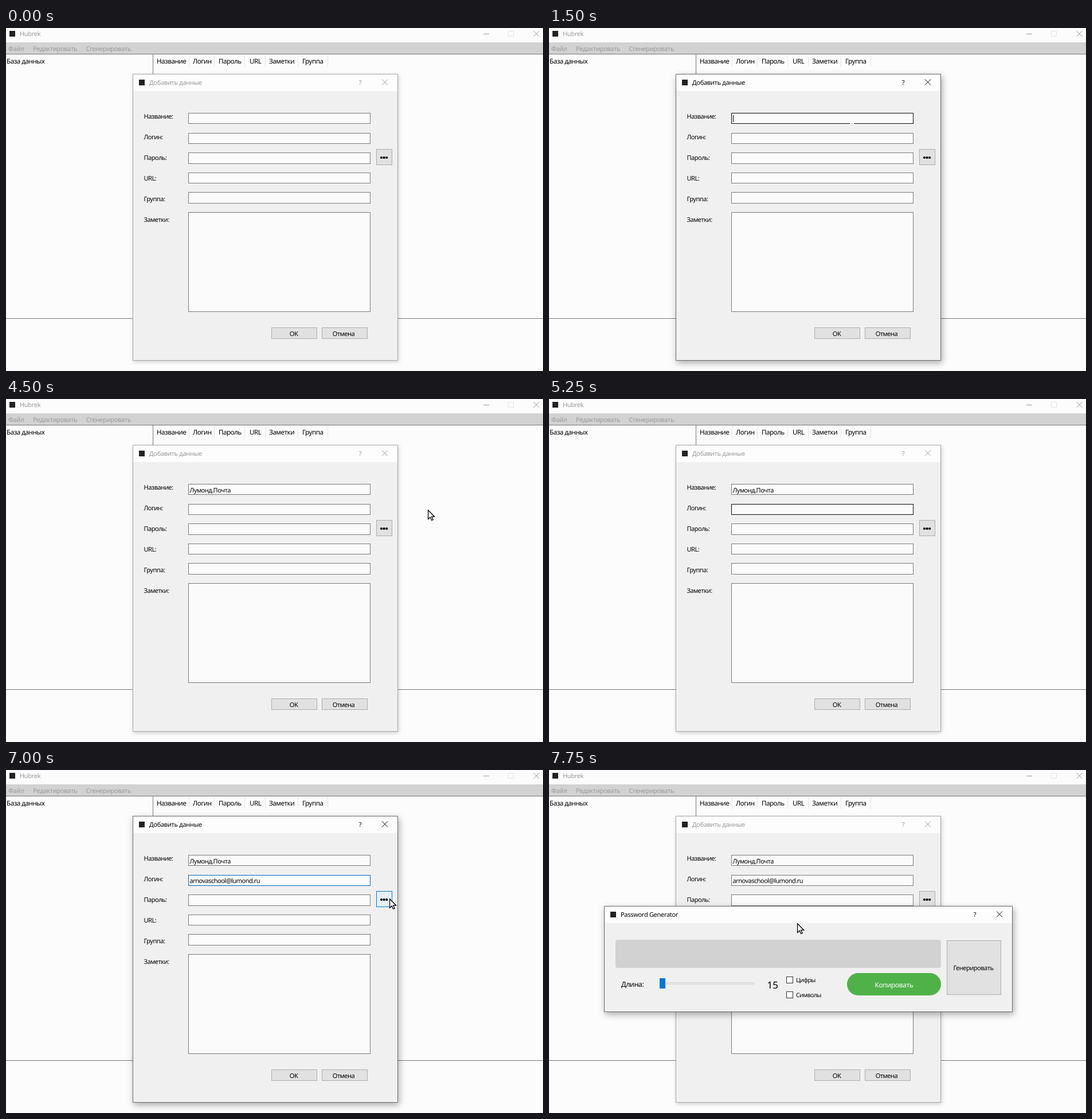
Recreate the animation shown at these times as an HTML page. Size 937 by 598 pixels, loop 8 s.

```html
<!DOCTYPE html>
<html lang="ru">
<meta charset="utf-8">
<title>Добавить данные</title>
<style>
  html, body { margin: 0; width: 100%; height: 100%; overflow: hidden; background: #fcfcfc; }
  svg { display: block; }
  text { font: 11px "Noto Sans", "Open Sans", sans-serif; letter-spacing: -.5px; text-rendering: geometricPrecision; }
  text.ui { letter-spacing: -.3px; }
  text.head { font-size: 11.6px; }
  text.check { font-size: 10.4px; }
  text.big { font-size: 17px; font-weight: 500; letter-spacing: 0; }
  text.length { font-size: 12.5px; }
  text.copy { font-size: 12px; letter-spacing: -.4px; fill: #fff; }
  text.mid { text-anchor: middle; }
  .gray { fill: #999; }
  .line { fill: none; stroke: #777; }
  .field { fill: #fbfbfb; stroke: #7a7a7a; }
  .field.focus { stroke: #0067b3; }
  .field.hover { stroke: #0a0a0a; }
  .button { fill: #e1e1e1; stroke: #adadad; }
  .button.hover { fill: #e5f1fb; stroke: #0078d7; }
  .window { color: #999; --edge: #aaa; filter: drop-shadow(1px 2px 3px #0003); }
  .window.active { color: #000; --edge: #6c6c6c; filter: drop-shadow(2px 4px 6px #0005); }
  .frame { fill: #f0f0f0; stroke: var(--edge); }
  .bar { fill: currentColor; }
  .cross { fill: none; stroke: currentColor; }
</style>
<body>
<svg id="stage" width="937" height="598" viewBox="0 0 937 598"></svg>
<script>
const text = (x, y, str, cls = '', id = '') => `<text id="${id}" class="${cls}" x="${x}" y="${y}">${str}</text>`;
const rect = (x, y, w, h, attrs) => `<rect x="${x}" y="${y}" width="${w}" height="${h}" ${attrs}/>`;
// Outlined box given by its outer pixel edges
const box = (x, y, w, h, cls, id = '') => rect(x + .5, y + .5, w - 1, h - 1, `class="${cls}" id="${id}"`);
const cross = (x, y) => `<path class="cross" d="M${x - 5} ${y - 5}l10 10m0-10l-10 10"/>`;
const icon = (x, y) => rect(x - 5, y - 5, 10, 10, 'fill="#222"');

const windowFrame = (x, y, w, h, title) =>
  box(x, y, w, h, 'frame') + rect(x + 1, y + 1, w - 2, 29, 'fill="#fdfdfd"') +
  icon(x + 16, y + 15) + text(x + 29, y + 19, title, 'ui bar') +
  text(x + w - 66, y + 19, '?', 'ui bar mid') + cross(x + w - 23, y + 14.5);

const labels = ['Название', 'Логин', 'Пароль', 'URL', 'Группа', 'Заметки'];
const fieldTops = [148, 183, 217, 252, 286, 321];
const fieldHeights = [19, 19, 20, 19, 20, 174];
const columns = [[263, 'Название'], [326, 'Логин'], [371, 'Пароль'], [425, 'URL'], [459, 'Заметки'], [517, 'Группа']];
const dividers = [319, 363, 416, 452, 509, 561];

const mainWindow =
  rect(0, 0, 937, 598, 'fill="#fcfcfc"') +
  icon(11, 10) + text(24, 14, 'Hubrek', 'ui gray') +
  '<path fill="none" stroke="#999" d="M833 10.5h10M920.5 5l10 10m0-10l-10 10"/>' +
  '<path fill="none" stroke="#e2e2e2" d="M876.5 5.5h9v9h-9z"/>' +
  rect(0, 25, 937, 21, 'fill="#d2d2d2"') +
  text(4, 39.5, 'Файл', 'ui gray') + text(47, 39.5, 'Редактировать', 'ui gray') + text(139.5, 39.5, 'Сгенерировать', 'ui gray') +
  '<path class="line" d="M0 45.5h937M256.5 46v460M0 506.5h937"/>' +
  text(1, 61.5, 'База данных', 'head') +
  columns.map(([x, name]) => text(x, 61.5, name, 'head')).join('') +
  `<path fill="none" stroke="#e3e3e3" d="${dividers.map(x => `M${x + .5} 47v21`).join('')}"/>`;

const dialog = windowFrame(221, 80, 463, 500, 'Добавить данные') +
  labels.map((name, i) => text(240.5, 158 + 36 * i, name + ':') +
    box(318, fieldTops[i], 318, fieldHeights[i], 'field', 'field' + i)).join('') +
  text(320.5, 162.5, 'Лумонд.Почта', '', 'value0') + text(320.5, 197, 'arnovaschool@lumond.ru', '', 'value1') +
  '<path id="caret" stroke="#000" d="M.5 0v12"/>' +
  box(646, 211, 28, 28, 'button', 'more') +
  [655, 659.6, 664.2].map(x => `<circle cx="${x}" cy="226" r="2.1"/>`).join('') +
  box(463, 522, 80, 20, 'button') + text(502, 536.5, 'OK', 'mid') +
  box(551, 522, 80, 20, 'button') + text(589, 536.5, 'Отмена', 'mid');

const generator = windowFrame(96, 237, 713, 185, 'Password Generator') +
  rect(116, 296, 568, 49, 'rx="4" fill="#d2d2d2"') +
  box(694, 297, 95, 95, 'button') + text(740.5, 349, 'Генерировать', 'mid') +
  text(126, 378, 'Длина:', 'length') +
  rect(193.5, 370.5, 164, 3, 'fill="#e7e7e7" stroke="#d6d6d6"') + rect(193, 363, 10, 18, 'fill="#0078d7"') +
  text(380.5, 381, '15', 'big') +
  [[360, 'Цифры'], [386, 'Символы']].map(([y, name]) =>
    rect(414.5, y + .5, 11, 11, 'fill="#fff" stroke="#333"') + text(431, y + 10, name, 'check')).join('') +
  rect(520, 354, 164, 39, 'rx="19.5" fill="#4fb248"') + text(602, 378.5, 'Копировать', 'copy mid');

const stage = document.getElementById('stage');
stage.innerHTML = mainWindow +
  `<g id="dialog" class="window">${dialog}</g>
  <path id="beam" fill="none" stroke="#fff" d="M0 .5h3m1 0h3"/>
  <g id="generator" class="window active">${generator}</g>
  <path id="arrow" fill="#fff" stroke="#000" stroke-width="1.3" d="M.6 .9v15.6l3.6-3.5 2.6 5.5 2.4-1-2.5-5.3h5z"/>`;

const initial = { active: false, focus: -1, hover: -1, filled: 0, caret: false, arrow: null, beam: null, more: false, generator: 0 };
// Each step changes the state from its time (ms) on
const steps = [
  [500, { arrow: [675, 434] }],
  [750, { arrow: null, beam: [575, 305] }],
  [1000, { beam: null, hover: 1 }],
  [1250, { hover: 0 }],
  [1500, { active: true, focus: 0, caret: true, beam: [525, 166] }],
  [2000, { filled: 1 }],
  [2250, { hover: -1, beam: null, arrow: [797, 194] }],
  [2500, { arrow: null }],
  [2750, { caret: false }],
  [3250, { active: false, focus: -1 }],
  [4500, { arrow: [736, 193] }],
  [4750, { arrow: [568, 176] }],
  [5000, { arrow: [512, 177] }],
  [5250, { arrow: null, hover: 1 }],
  [5500, { active: true, focus: 1, caret: true }],
  [6000, { filled: 2, beam: [533, 217] }],
  [6250, { hover: -1, beam: null, arrow: [676, 225] }],
  [6500, { arrow: [680, 223] }],
  [6750, { arrow: [669, 224], more: true }],
  [7000, { caret: false }],
  [7250, { active: false, focus: -1, generator: .42 }],
  [7500, { generator: 1, more: false, arrow: [665, 232] }],
  [7750, { arrow: [433, 267] }],
];

const el = id => document.getElementById(id);
const show = (id, on) => el(id).setAttribute('visibility', on ? 'visible' : 'hidden');
const place = (id, pos) => {
  show(id, pos);
  if (pos) el(id).setAttribute('transform', `translate(${pos})`);
};

function render(t) {
  const s = Object.assign({}, initial, ...steps.filter(([at]) => at <= t).map(([, change]) => change));
  el('dialog').classList.toggle('active', s.active);
  el('more').classList.toggle('hover', s.more);
  labels.forEach((_, i) => {
    el('field' + i).classList.toggle('focus', s.focus === i);
    el('field' + i).classList.toggle('hover', s.hover === i);
  });
  [0, 1].forEach(i => show('value' + i, s.filled > i));
  const typed = s.filled > s.focus && s.focus >= 0 ? el('value' + s.focus).getComputedTextLength() : 0;
  place('caret', s.caret && [Math.round(321 + typed), fieldTops[s.focus] + 4]);
  place('arrow', s.arrow);
  place('beam', s.beam);
  show('generator', s.generator);
  el('generator').setAttribute('opacity', s.generator);
  const scale = s.generator < 1 ? .97 : 1;
  el('generator').setAttribute('transform', `translate(452.5 329.5) scale(${scale}) translate(-452.5 -329.5)`);
}

const start = performance.now();
(function tick() {
  render((performance.now() - start) % 8000);
  requestAnimationFrame(tick);
})();
</script>
</body>
</html>
```
